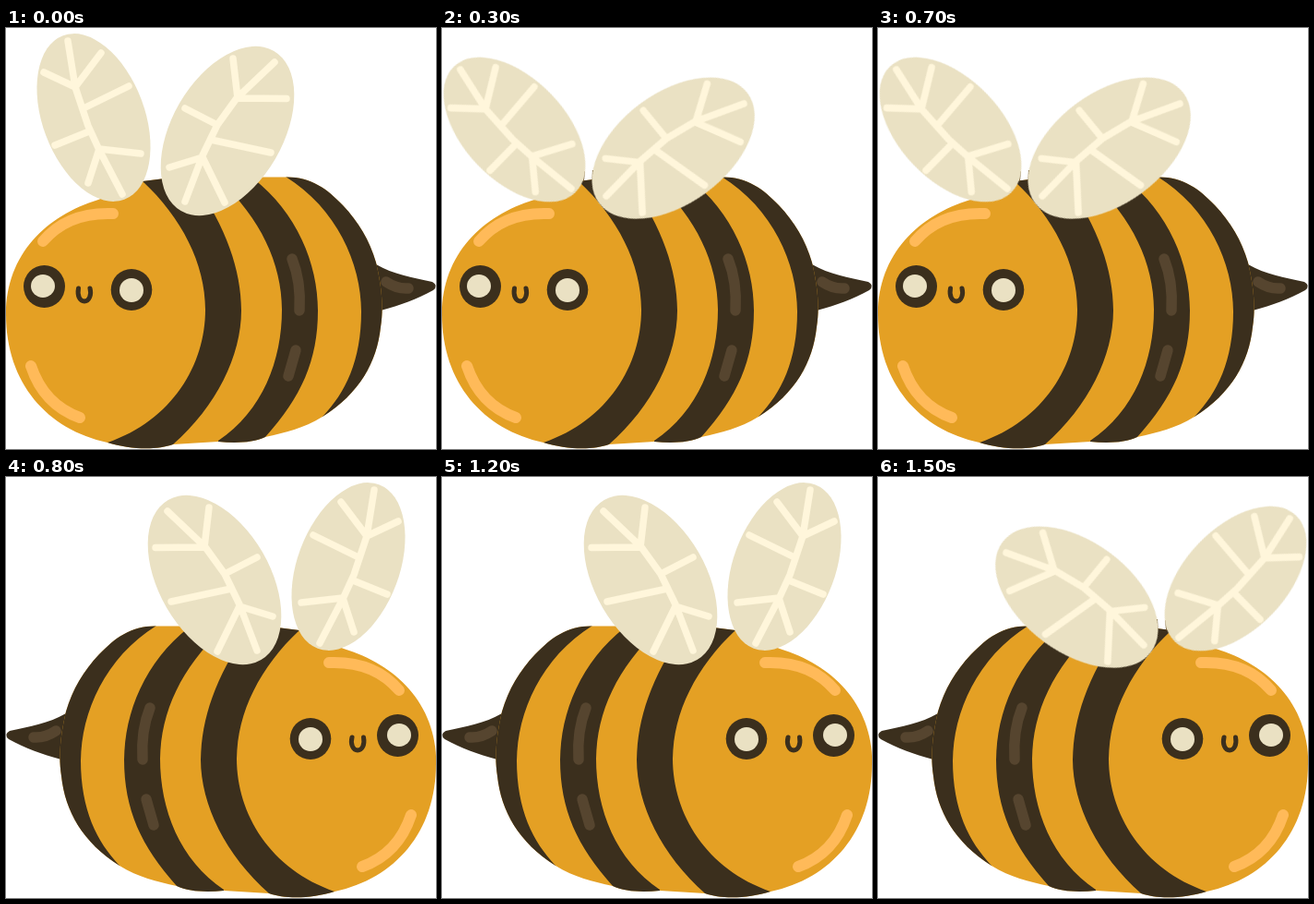
Write an HTML page without scripts that moves like this. It is 466 px wide and 456 px high and loops after 1600 ms.

```html
<!DOCTYPE html>
<html lang="en">
<head>
<meta charset="utf-8">
<title>Bee</title>
<style>
  html, body { margin: 0; width: 100%; height: 100%; overflow: hidden; background: #fff; }
  svg { display: block; width: 466px; height: 456px; }
  .dark { fill: #3b2f1d; }
  .cream { fill: #eae1c3; }
  .line { fill: none; stroke-width: 12; stroke-linecap: round; stroke-linejoin: round; }
  .shine { stroke: #ffba59; }
  .gloss { stroke: #56452f; stroke-width: 11.5; }
  .smile { stroke: #3b2f1d; stroke-width: 5; }
  .vein { stroke: #fff6db; stroke-width: 7.5; }
  .roots { stroke: #6a4f22; stroke-width: 1; fill: none; animation: show .2s step-end infinite; }

  .bee { transform-origin: 233px 0; animation: turn 1.6s step-end infinite; }
  .wing { animation: flap .2s step-end infinite; }
  .left { --spread: -23.4deg; transform-origin: 118.4px 143.2px; }
  .right { --spread: 23.4deg; transform-origin: 200.4px 146.6px; }

  @keyframes turn { 0% { transform: none; } 50%, 100% { transform: scaleX(-1); } }
  @keyframes flap { 0% { transform: none; } 50%, 100% { transform: rotate(var(--spread)); } }
  @keyframes show { 0% { opacity: 0; } 50%, 100% { opacity: 1; } }
</style>
</head>
<body>
<svg viewBox="0 0 466 456">
  <clipPath id="body">
    <path d="M0 310C0 245 44 203 100 186C118 180 132 171 148 166L172 163L280 161.500H303C330 161 348 174 365 192C382 210 394 230 401 254C406 275 410 300 406 324C402 362 383 396 343 421C322 434 303 438 281 443C268 449 250 450 230 448L181 451C165 457 135 457 110 449C45 435 0 385 0 310Z"/>
  </clipPath>

  <g class="bee">
    <path class="dark" d="M398 254L401 256C420 267 440 270 462 275Q469 279 463 284C445 294 428 300 406 306H398Z"/>

    <g clip-path="url(#body)">
      <rect width="466" height="456" fill="#e4a024"/>
      <g class="dark">
        <path d="M148 155V166C190 205 216 255 216 305C216 365 180 425 110 449V460H181V451C228 410 255 355 255 306C255 262 238 215 205 168V155Z"/>
        <path d="M232 155V166C275 205 299 255 299 305C299 360 278 415 230 447V456H281V443C320 400 338 360 338 306C338 255 315 200 268 163V155Z"/>
        <path d="M303 155V161C358 195 385 255 385 307C385 360 368 395 343 421V440H430V155Z"/>
      </g>
    </g>

    <path class="line shine" d="M40 231Q67 199 116 201M27 366Q41 408 80 422"/>
    <path class="line gloss" d="M310 250Q320 275 318 306M314 349L306 377M412 275Q424 283 436 282"/>

    <g class="dark">
      <ellipse cx="41.500" cy="280" rx="22.500" ry="23"/>
      <ellipse cx="136" cy="283.500" rx="22.300" ry="22.500"/>
    </g>
    <g class="cream">
      <ellipse cx="40" cy="279.500" rx="13" ry="12.500"/>
      <circle cx="136" cy="284" r="13"/>
    </g>
    <path class="line smile" d="M78.500 282C77 290 80 296 85 296S93 289 91 282"/>

    <path class="roots" d="M154.500 155L153.500 165M163.500 154L163 164"/>

    <g class="wing left">
      <ellipse class="cream" cx="95" cy="97" rx="55.300" ry="94.800" transform="rotate(-20.500 95 97)"/>
      <path class="line vein" d="M67 14L75 64L89 106L101 132L126 180M103 27L75 64L41 48M133 63L84 87M53 127L90 112M146 136L101 131L89 168"/>
    </g>
    <g class="wing right">
      <ellipse class="cream" cx="240" cy="111.500" rx="60" ry="100.200" transform="rotate(30.200 240 111.500)"/>
      <path class="line vein" d="M291 37L250 76L229 105L213 138L194 188M246 33L251 76L304 76.500M194 87L229 105M287 135L222 121M177 151L213 140L237 189"/>
    </g>
  </g>
</svg>
</body>
</html>
```
